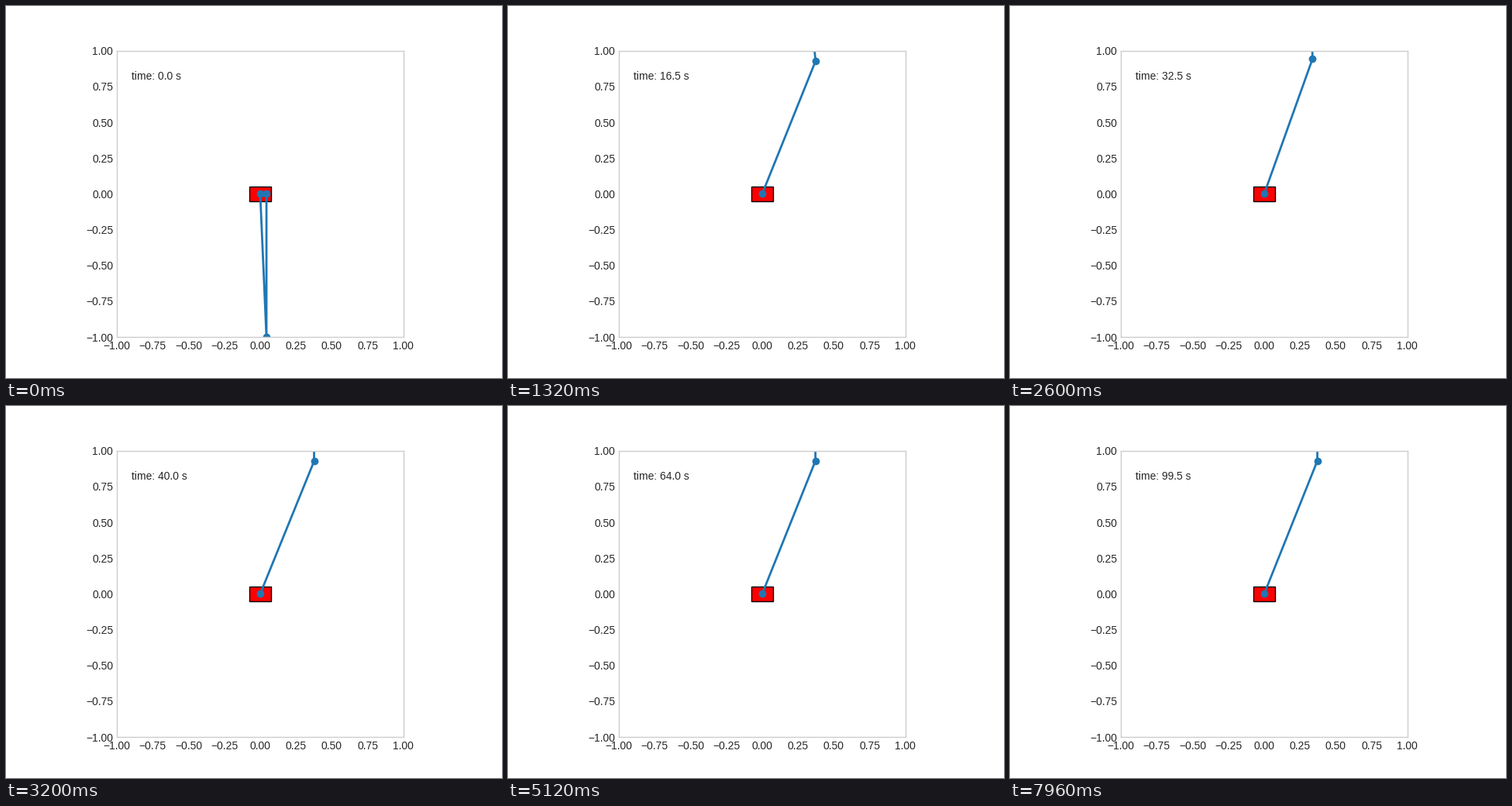
Write a matplotlib script that moves like this. It is 640 by 480 pixels and loops after 8 s.

```python
import numpy as np
import matplotlib.pyplot as plt
from matplotlib.animation import FuncAnimation
from matplotlib.patches import Rectangle

FRAMES = 200
DT = 0.5          # simulated seconds per frame
REST = 21.75      # settled lean of the first link, degrees from vertical
START = 177.5

plt.rcParams.update({
    "font.family": "Liberation Sans",
    "font.size": 10,
    "text.color": "0.15",
    "xtick.color": "0.15",
    "ytick.color": "0.15",
    "axes.edgecolor": "0.8",
    "axes.linewidth": 1,
    "xtick.major.size": 0,
    "ytick.major.size": 0,
    "lines.solid_capstyle": "round",
})


def lower_angle(t):
    """Swing up from hanging, then ring around the rest angle."""
    swing = np.exp(-(t / 2.5) ** 1.27)
    ring = 3.4 * np.exp(-max(0, t - 24) / 25)
    ring *= np.cos(2 * np.pi * (t - 25.5) / 11.9)
    return REST + (START - REST) * swing + ring * (1 - swing)


def upper_angle(t):
    """Stays near vertical, dipping left during the swing-up."""
    return -17.8 * (t / 5) * np.exp(1 - t / 5)


def pose(t):
    angles = np.radians([lower_angle(t), upper_angle(t)])
    x = np.concatenate([[0], np.cumsum(np.sin(angles))])
    y = np.concatenate([[0], np.cumsum(np.cos(angles))])
    return x, y


fig = plt.figure(figsize=(6.4, 4.8), dpi=100, facecolor="white")
ax = fig.add_subplot(aspect="equal", xlim=(-1, 1), ylim=(-1, 1))
ticks = np.linspace(-1, 1, 9)
ax.set_xticks(ticks)
ax.set_yticks(ticks)

ax.add_patch(Rectangle((-0.075, -0.05), 0.15, 0.1, fc="red", ec="black", lw=1))
arm, = ax.plot([], [], "o-", color="#1f77b4", lw=2, ms=6)
clock = ax.text(0.05, 0.9, "", transform=ax.transAxes)


def update(i):
    t = i * DT
    arm.set_data(*pose(t))
    clock.set_text(f"time: {t:.1f} s")
    return arm, clock


anim = FuncAnimation(fig, update, frames=FRAMES, interval=40,
                     repeat=True, repeat_delay=0, blit=False)
plt.show()
```
